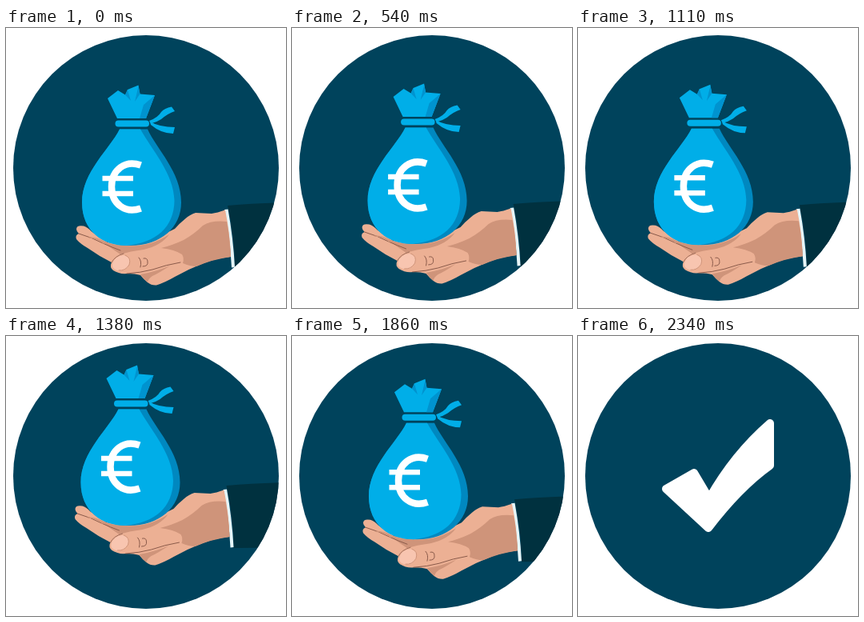
Recreate the animation shown at these times as an HTML page with a canvas. Size 350 by 350 pixels, loop 4500 ms.

```html
<!DOCTYPE html>
<html lang="en">
<head>
<meta charset="utf-8">
<title>Money bag in hand</title>
<style>
  html, body { margin: 0; width: 100%; height: 100%; overflow: hidden; background: #fff; }
  canvas { display: block; width: 350px; height: 350px; }
</style>
</head>
<body>
<canvas id="stage" width="350" height="350"></canvas>
<script>
const ctx = document.getElementById('stage').getContext('2d');
const LOOP = 4500, STEP = 30, CHECK_AT = 2340;

const C = {
  disc: '#00435c', sleeve: '#00313f', cuff: '#e6f6f9',
  skin: '#ecb094', shade: '#cf947a', line: '#8a5a4a', nail: '#f8c5b0',
  bag: '#00aee8', bagShade: '#0088c0', fold: '#0093cf'
};

// Each bob: start, end, sideways reach, height
const BOBS = [
  [0, 490, 0, -26],
  [490, 1140, -7, -35.5],
  [1140, 1630, -1.5, -35],
  [1630, 2350, 1.4, -25]
];

function offset(t) {
  const [from, to, dx, dy] = BOBS.find(b => t < b[1]);
  const k = (1 - Math.cos(2 * Math.PI * (t - from) / (to - from))) / 2;
  return [dx * k, dy * k];
}

function fill(path, color) {
  ctx.fillStyle = color;
  ctx.fill(new Path2D(path));
}

function stroke(path, color, width, cap = 'round') {
  ctx.strokeStyle = color;
  ctx.lineWidth = width;
  ctx.lineCap = cap;
  ctx.lineJoin = 'round';
  ctx.stroke(new Path2D(path));
}

function drawSleeve() {
  fill('M277 222 Q310 219 350 218 L350 299.5 L286 300 Q286 262 277 222Z', C.sleeve);
  fill('M273 227 L277.5 226.5 Q284 262 286 299 L282 299.5 Q280 262 273 227Z', C.cuff);
}

function drawHand() {
  fill('M97 247.5 Q88 246 88 251.5 Q88 254 91 257 Q86 259 88 264 Q93 270 102 275 Q116 285 132 293 Q129 299 134 303 Q142 308 151 307 Q162 307 168 309 Q172 314 177 318 Q182 322 188 321.5 Q199 318 211 311 Q229 301 247 294 Q262 288 281 286 Q280 256 274 227.5 Q264 231 257 232 L237 231 Q230 233 224 238.5 Q216 245 211 251 L180 266 L127 268 L107 254.5 Q102 249 97 247.5Z', C.skin);
  // Wrist and palm shadows
  fill('M276 242 Q257 240 246 247 Q236 257 222 265 Q207 272 194 275 Q211 277 220 283 Q223 288 221 294 Q230 298 238 298 Q259 289 281 286 Q280 262 276 242Z', C.shade);
  fill('M168 308 Q190 304 205 297 Q192 306 183 310 Q178 313 177 318 Q172 314 168 308Z', C.shade);
  fill('M112 260 Q127 272 152 272 Q180 274 204 258 Q194 272 172 277 Q155 279 143 283 Q126 272 112 260Z', C.shade);
  // Creases
  stroke('M91 257 Q108 262 121 269 Q132 274 143 278', C.line, 1);
  stroke('M104 262 Q115 262 122 269', C.shade, 1.4);
  stroke('M132 293 Q136 285 147 282', C.line, .8);
  stroke('M151 307 Q168 306 183 302 Q200 296 218 293', C.line, 1);
  stroke('M166 287 Q170 291 168 299 M172 288 Q177 287 177 292 Q178 298 171 298', C.line, 1);
  fill('M133 295 Q136 285 147 284 Q157 286 154 296 Q149 305 139 303 Q132 301 133 295Z', C.nail);
  stroke('M149 284 Q157 287 154 296 Q149 304 141 303', C.shade, 1);
}

function drawBag() {
  fill('M142 126.5 C130 151 95 180 95 218 C95 254 121 272 155 272 C194 272 219 249 219 218 C219 180 188 151 177 126.5Z', C.bagShade);
  fill('M142 126.5 C130 151 95 180 95 218 C95 254 121 272 151 272 C188 268 210 249 210.5 216 C210 182 182 152 168 126.5Z', C.bag);

  fill('M127 88 L140 78 L149 83.5 L152 77 L165.5 71.5 L167.5 82.5 L186 84 L175 113 L139 113Z', C.bag);
  fill('M149 83.5 L152 77 L156 91Z M167.5 82.5 L165.5 73 L161 92Z M186 84 L172 96 L167 113 L175 113Z', C.fold);

  fill('M179 116 Q190 112 194 105 Q198 100 207 98.5 L211 104 Q202 107 194 114 Q188 118 181 119.5Z', C.bag);
  fill('M180 117 Q192 124 211 124 L209 132 Q194 132 181 121Z', C.bag);
  stroke('M140.5 119.5 H175', C.bag, 8);

  stroke('M168.5 171.5 C149 164.5 132 177 132 198.5 C132 220 149 232.5 168.5 225.5', '#fff', 8.5, 'butt');
  stroke('M120.5 188 H159 M120.5 207 H159', '#fff', 6.5, 'butt');
}

function drawCheck() {
  const tick = 'M110 191 L145 171 L164 203 Q195 148 240 109 L240 162 Q202 189 163 240Z';
  fill(tick, '#fff');
  stroke(tick, '#fff', 10);
}

function draw(t) {
  ctx.clearRect(0, 0, 350, 350);
  ctx.save();
  ctx.beginPath();
  ctx.arc(175, 175, 166, 0, 2 * Math.PI);
  ctx.fillStyle = C.disc;
  ctx.fill();
  ctx.clip();
  if (t < CHECK_AT) {
    ctx.translate(...offset(t));
    drawSleeve();
    drawHand();
    drawBag();
  } else {
    drawCheck();
  }
  ctx.restore();
}

const start = performance.now();
function tick() {
  const t = (performance.now() - start) % LOOP;
  draw(Math.floor(t / STEP) * STEP);
  requestAnimationFrame(tick);
}
tick();
</script>
</body>
</html>
```
